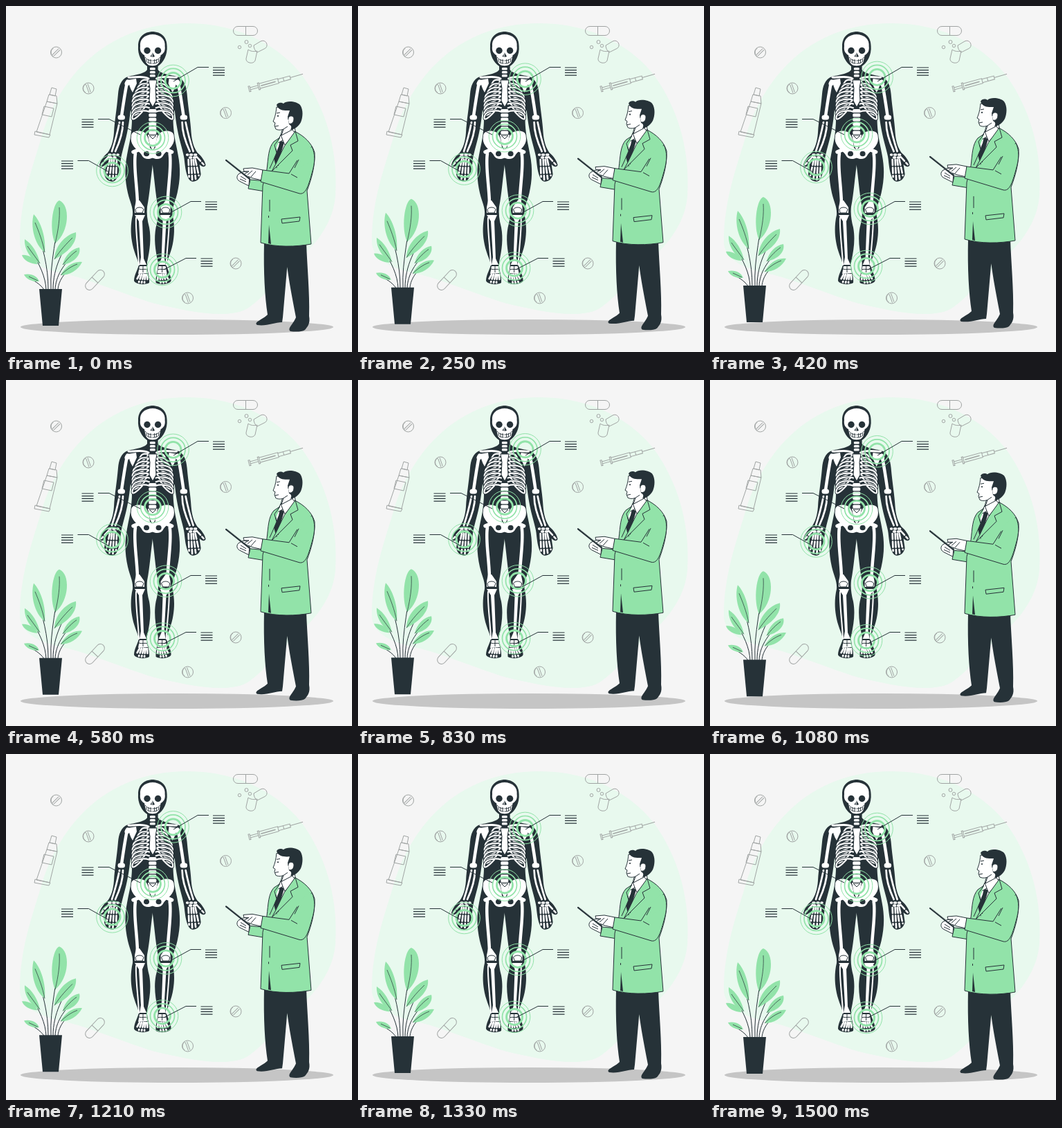
Animation, 500 px wide and 500 px high, one loop 1.54 s. Source, as an HTML page:

```html
<!DOCTYPE html>
<html lang="en">
<head>
<meta charset="utf-8">
<title>Skeleton check-up</title>
<style>
html, body { margin: 0; width: 100%; height: 100%; overflow: hidden; background: #f5f5f5 }
svg { display: block; width: 100%; height: 100% }
.line { fill: none; stroke: #263238 }
.grey { fill: none; stroke: #a0a4a3 }
.dark { fill: #263238 }
.white { fill: #fff }
.green { fill: #92e3a9 }
.bone { fill: none; stroke: #fff; stroke-linecap: round }
.ring { fill: none; stroke: #92e3a9 }
.coat { fill: #92e3a9; stroke: #263238; stroke-linejoin: round }
.skin { fill: #fff; stroke: #263238; stroke-linejoin: round }
</style>
</head>
<body>
<svg viewBox="0 0 500 500">
  <path fill="#e8f9ee" d="M20 340C20 280 38 235 52 187C76 108 140 25 262 25C340 25 398 60 430 103C466 155 480 215 476 275C472 320 440 352 415 374C390 398 375 418 352 435C325 455 262 441 215 430C180 420 115 393 85 387C40 378 20 362 20 340Z"/>
  <ellipse cx="247" cy="464" rx="226" ry="11" fill="#c5c5c5"/>

  <g class="grey">
    <g id="tablets"></g>
    <rect x="328.500" y="29.500" width="35" height="13" rx="6.500"/><path d="M346.500 29.500v13"/>
    <g transform="rotate(-47 128.500 396)"><rect x="111" y="390" width="35" height="12" rx="6"/><path d="M128.500 390v12"/></g>
    <path d="M358 57L368 51C376 47 381 59 373 62L363 67C360 65 358 61 358 57Z"/>
    <path d="M350 63C354 66 359 66 363 65L360 79C357 85 346 82 347 76Z"/>
    <circle cx="347.500" cy="52" r="2.500"/><circle cx="352.500" cy="57.500" r="2.200"/><circle cx="337.500" cy="59.500" r="2.200"/>
    <g transform="translate(351 120) rotate(-15.500)">
      <path d="M0-4h2v8h-2zM2-1.500h12v3h-12zM14-5h2v10h-2zM16-3.500h28v7h-28zM44-2.500h18v5h-18zM62 0h19M52-2.500v5"/>
      <path d="M18 0h22" stroke-width="1.500"/>
    </g>
    <path d="M66 118L73 120L71 130L63 128ZM62 128L73 130L74 141L59 138ZM59 138L74 141L63 186L44 182ZM42 181L64 186L62 190L41 186ZM55 145L69 148L66 160L52 157Z"/>
  </g>

  <path id="body" class="dark" d="M213 37C198 37 191 46 191 58C190 70 196 82 204 87V92C201 98 184 100 176 102C166 106 163 116 162 127C160 150 157 165 156 183C155 196 152 205 147 212C141 217 136 224 135 230C137 234 141 232 144 229L142 243C143 248 146 252 150 253C154 255 158 253 160 249C164 241 165 230 166 221C167 212 173 195 176 178C178 168 179 158 180 150C183 160 182 170 181 181C180 193 177 203 175 215C171 235 172 252 176 270C179 283 184 291 183 302C180 315 180 328 182 340C184 354 190 365 192 374C190 382 185 389 185 397C187 402 200 404 207 400C208 390 203 381 204 370C208 352 210 336 207 320C204 309 203 299 204 290C208 270 209 248 213 222Z"/>
  <use href="#body" transform="matrix(-1 0 0 1 423.600 0)"/>
  <g id="bones">
    <path class="white" d="M213 41C199 41 193 49 194 58C193 65 196 69 200 71L202 81C205 86 209 87 213 86Z"/>
    <circle class="dark" cx="204" cy="64.500" r="4.700"/>
    <path class="dark" d="M212 67L208.500 73L212 74Z"/>
    <path class="line" stroke-width=".9" d="M201 74C204 78 208 79 212 79M203 77v4M206 77v5M209 77v6M204 81C206 83 209 83 212 83"/>
    <g id="ribs"></g>
    <path class="bone" stroke-width="3" d="M206 105C197 100 186 104 177 103"/>
    <path class="white" d="M176 107L188 105L189 112L183 125C179 119 178 113 176 107Z"/>
    <path class="bone" stroke-width="4.500" d="M175 110C172 125 169 145 167 159"/>
    <path class="bone" stroke-width="7" d="M176 110L175 112M165 161h3.500"/>
    <path class="bone" stroke-width="2.700" d="M169 168C169 183 164 197 158 210M164 168C161 183 157 198 153 210"/>
    <path class="bone" stroke-width="3.500" stroke-dasharray="2 4" d="M149 215H162M150 219H162"/>
    <path class="bone" stroke-width="2.600" stroke-dasharray="8 3.600" d="M150 222L145 245M153 222L149.500 250M156 222L154.500 251M160 222L159 247M148 218L138 229"/>
    <path class="white" d="M181 188C181 180 192 179 199 182C205 186 207 194 208 205L213 209V219C207 222 200 222 197 217C194 211 187 207 184 202C181 198 180 193 181 188Z"/>
    <ellipse class="dark" cx="203" cy="213.500" rx="4" ry="3.800"/>
    <path class="bone" stroke-width="4.500" d="M187 213C184 230 189 255 190 284"/>
    <path class="bone" stroke-width="5.500" d="M184 211L191 208"/>
    <path class="white" d="M188 281H193L200 291V299H186V291Z"/>
    <path class="skin" d="M187 294C189 290 197 290 199 294L197 299H188Z"/>
    <path class="white" d="M186 302H201L197 311L199 365L203 374H193L195 363L192 311Z"/>
    <path class="bone" stroke-width="2" d="M188 306C187 325 191 348 192 374"/>
    <path class="white" d="M193 376H203L205 386L191 387Z"/>
    <path class="line" d="M192 380C197 382 200 379 204 381M198 376v9"/>
    <path class="bone" stroke-width="2.700" stroke-dasharray="7 3.700" d="M193 388L188 397M196 388L192 399M199 388L196 400M201.500 388L200 400M204 388L204.500 398"/>
  </g>
  <use href="#bones" transform="matrix(-1 0 0 1 423.600 0)"/>
  <g id="spine" class="white"></g>
  <path class="skin" d="M206 107H218L216 119L217 137L212 146L207 137L208 119Z"/>
  <path class="white" d="M205 186H219L216 201L212 209L208 201Z"/>
  <path class="line" d="M207 187H217L212 192Z"/>

  <g id="float">
    <g id="rings"></g>

    <g id="plant">
      <path class="line" d="M58 410C57 391 49 374 35 352M61 410C61 375 53 350 43 315M65 410C63 370 75 330 76 294M68 410C68 377 83 352 96 333M71 410C72 390 82 375 102 354M75 410C76 395 87 382 103 372M55 410C49 401 40 397 32 392"/>
      <g class="green">
        <path d="M71 343C62 324 67 284 77 281C93 287 92 326 71 343Z"/>
        <path d="M56 356C41 345 35 318 40 301C50 311 58 334 56 356Z"/>
        <path d="M70 366C70 348 85 331 101 327C103 342 90 356 70 366Z"/>
        <path d="M49 372C36 367 26 352 27 337C38 344 46 357 49 372Z"/>
        <path d="M82 374C85 360 95 351 106 349C109 360 98 371 82 374Z"/>
        <path d="M79 389C85 377 97 368 110 370C104 382 92 389 79 389Z"/>
        <path d="M48 398C39 399 29 395 26 388C36 386 45 390 48 398Z"/>
        <path d="M46 373C35 373 25 367 23 360C32 359 41 364 46 373Z"/>
      </g>
      <path class="line" stroke-width=".7" d="M71 343C76 322 78 306 77 291M56 356C53 340 47 325 42 313M70 366C79 352 88 343 96 335M49 372C42 362 35 353 31 347M82 374C88 366 96 358 102 354M79 389C87 381 95 376 103 373M46 397L33 391"/>
      <path class="dark" d="M48 409H81L76 462H53Z"/>
    </g>

    <g id="doctor">
      <path class="dark" d="M373 342L409 346L400 450L399 457C388 457 377 463 363 461C357 457 371 453 378 446C374 420 372 385 373 342ZM403 346L434 342C435 375 439 415 438 448C440 459 436 463 432 468C428 471 418 471 411 470C406 466 415 460 419 450C413 418 406 385 403 346Z"/>
      <path class="skin" d="M352 244C347 236 341 240 336 243C332 247 334 252 339 254L351 260Z"/>
      <path class="coat" d="M353 251L350 264L374 268V253Z"/>
      <path class="skin" d="M400 176L397 187L389 205L393 232L419 187L417 174Z"/>
      <path class="coat" d="M396 190L387 196C379 205 379 220 377 236L371 260L368 342C390 349 420 348 441 344L435 267C441 251 447 231 446 212C442 198 431 188 417 181L393 231L390 204Z"/>
      <path class="dark" d="M396 194L402 197L400 204L391 235L387 220L394 203ZM380 316L383 344L379 343Z"/>
      <path class="skin" d="M397 186L400 194L403 201L418 184L413 178ZM397 186L391 199L400 194"/>
      <path class="coat" d="M418 181L422 195L411 201L414 209L384 239L390 228L402 203ZM396 190L388 201L391 212L386 224L381 235"/>
      <path class="skin" d="M371 237L356 234L343 235L344 239L351 239L344 243L349 246L357 249L370 252Z"/>
      <path class="line" d="M356 238L349 244M361 239L354 247M339 246L347 251M338 250L347 254"/>
      <path class="coat" d="M371 237L368 254L424 271C433 273 437 260 442 242C447 225 447 214 442 203L421 223L409 242Z"/>
      <path fill="#92e3a9" d="M420 220L440 201L444 224L424 233Z"/>
      <path class="line" d="M423 222L417 234M412 243L421 248M398 308L425 305L424 311L399 314ZM381 280V297M379.500 303V306"/>
      <path class="line" stroke-width="2.200" stroke-linecap="round" d="M318 223L352 250"/>
      <path stroke="#92a09c" stroke-width=".6" d="M320 223L350 247"/>

      <path class="skin" d="M391 146C390 155 389 160 386 167L389 169L388 173L390 178C394 180 399 179 401 178L398 187L415 178L416 150Z"/>
      <path class="dark" d="M391 143C393 139 398 139 401 141C406 136 420 138 425 143C430 150 429 161 426 168C422 175 417 178 411 179C414 174 411 172 409 171L407 160L410 151C403 151 394 152 391 143Z"/>
      <path class="skin" d="M408 164C407 158 416 157 416 163C416 169 412 171 409 170"/>
      <path class="line" d="M391 155L396 154M389 174L394 173M401 178L407 174"/>
      <circle class="dark" cx="393" cy="159" r="1.100"/>
    </g>
  </g>

  <g id="callouts" class="line"></g>
</svg>
<script>
const $ = id => document.getElementById(id);
const fill = (id, items, draw) => $(id).innerHTML = items.map(draw).join('');
const range = n => [...Array(n).keys()];

fill('tablets', [[72.5, 67, -45], [119, 119, 70], [317.5, 154.500, 70], [332, 372, -45], [262.500, 422, 70]], ([x, y, tilt]) =>
  `<g transform="translate(${x} ${y})"><circle r="8"/><path transform="rotate(${tilt})" d="M-6.500-1.300h13M-6.500 1.300h13"/><path d="M-4 6A7 7 0 0 1 -4-6"/></g>`);

fill('ribs', range(9), i => {
  const y = 108 + i * 5.6, out = 193 - Math.min(i * 3, 10), inner = 206 - Math.max(0, i - 5) * 3;
  const d = `M${inner} ${y}C${inner - 7} ${y + 8} ${out - 3} ${y + 16} ${out} ${y + 6}C${out + 2} ${y - 1} 199 ${y - 3} 207 ${y}`;
  return `<path class="line" stroke-width="3.800" d="${d}"/><path class="bone" stroke-width="2.100" d="${d}"/>`;
});

const vertebra = (y, w, h) => `<rect x="${211.8 - w / 2}" y="${y}" width="${w}" height="${h}" rx="1.500"/>`;
fill('spine', range(9), i => i < 3 ? vertebra(89 + i * 5, 8, 3.6) : vertebra(149 + (i - 3) * 6.3, 11, 5));

fill('rings', [[241.5, 108], [212, 190.5], [153.500, 238], [231, 298], [226, 381]], ([x, y]) =>
  [[22.8, 1], [17.5, 1.700], [11.5, 2.800]].map(([r, w]) =>
    `<circle class="ring" cx="${x}" cy="${y}" r="${r}" stroke-width="${w}"/>`).join(''));

// Each callout: start of the leader, its direction, its far end, and the left edge of the note
fill('callouts', [
  [293, 88.5, -16, 242, 109, 299], [133, 163.500, 16, 194, 186, 109.500], [103.500, 223.500, 16, 149, 240, 80],
  [282, 282.500, -15, 237, 299, 288], [275, 364.500, -15, 228, 381, 281.500]
], ([x, y, run, endX, endY, note]) =>
  `<path d="M${x} ${y}h${run}L${endX} ${endY}"/><path stroke-width="1.200" d="${range(4).map(i => `M${note} ${y + .5 + i * 3.7}h17`).join('')}"/>`);

const LOOP = 1540, PEAK = 740, RISE = 8;
function frame(now) {
  const lift = RISE / 2 * (1 + Math.cos(2 * Math.PI * (now - PEAK) / LOOP));
  $('float').setAttribute('transform', `translate(0 ${-lift})`);
  requestAnimationFrame(frame);
}
frame(performance.now());
</script>
</body>
</html>
```
